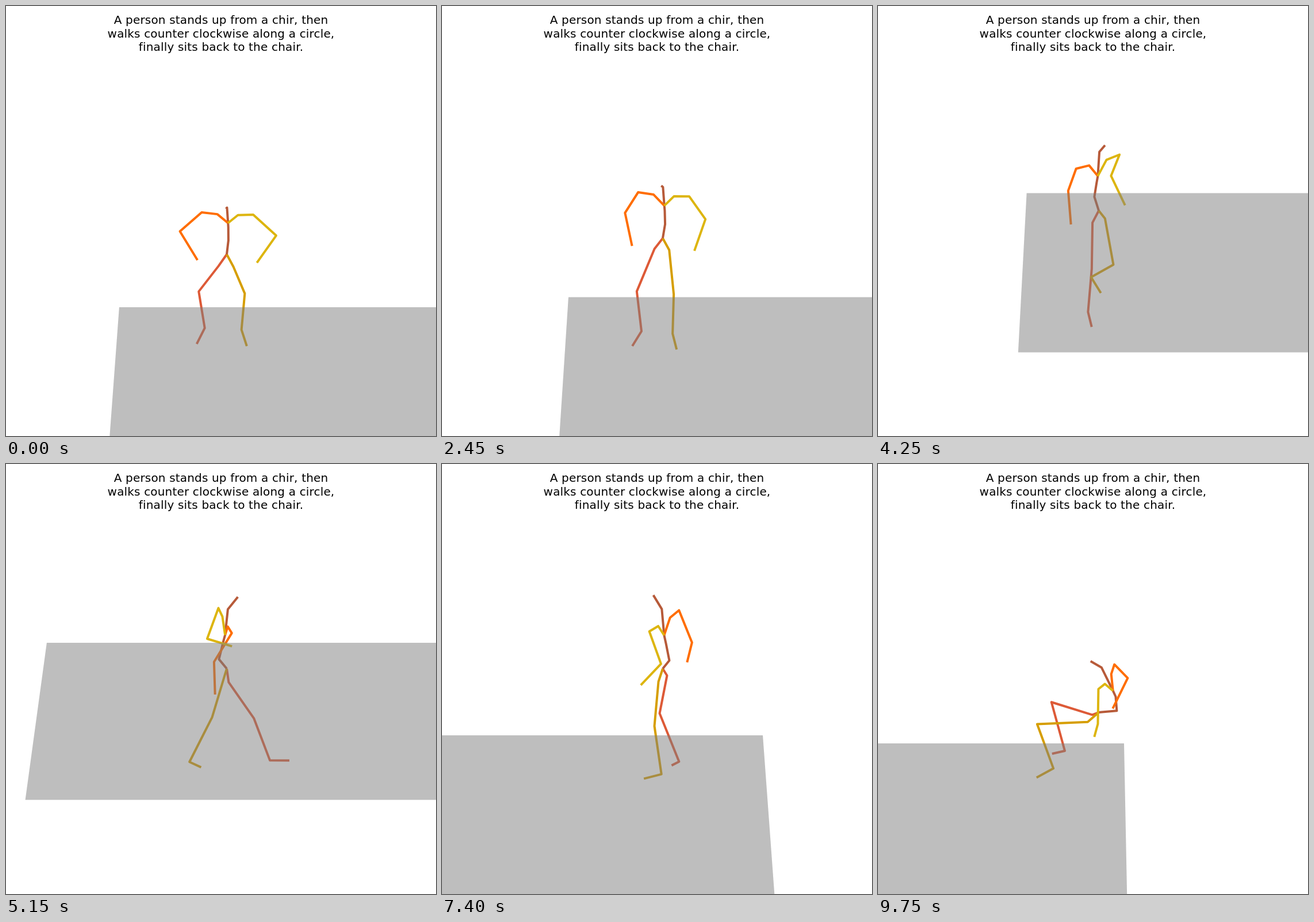
Recreate the animation shown at these times as an HTML page with a canvas. Size 748x748 px, loop 9800 ms.

```html
<!DOCTYPE html>
<html lang="en">
<head>
<meta charset="utf-8">
<title>Walking figure</title>
<style>
  html, body { margin: 0; width: 100%; height: 100%; overflow: hidden; background: #fff; }
  canvas { display: block; }
</style>
</head>
<body>
<canvas id="stage" width="748" height="748"></canvas>
<script>
const ctx = document.getElementById('stage').getContext('2d');
const LOOP = 9800, STEP = 50, RAD = Math.PI / 180;
const CAPTION = [
  'A person stands up from a chir, then',
  'walks counter clockwise along a circle,',
  'finally sits back to the chair.'
];

// Smooth curve through [time, value] points, without overshoot.
function track(...points) {
  const last = points.length - 1;
  const slope = i => (points[i + 1][1] - points[i][1]) / (points[i + 1][0] - points[i][0]);
  const tangent = i => {
    if (i === 0 || i === last) return 0;
    const a = slope(i - 1), b = slope(i);
    return a * b > 0 ? 2 * a * b / (a + b) : 0;
  };
  return t => {
    if (t >= points[last][0]) return points[last][1];
    let i = 0;
    while (t >= points[i + 1][0]) i++;
    const span = points[i + 1][0] - points[i][0], p = (t - points[i][0]) / span, q = 1 - p;
    return q * q * (1 + 2 * p) * points[i][1] + p * p * (3 - 2 * p) * points[i + 1][1]
      + span * p * q * (q * tangent(i) - p * tangent(i + 1));
  };
}

const sitting = track([0, 1], [2100, 1], [2950, 0], [7900, 0], [8900, 1]);
const walking = track([0, 0], [2950, 0], [3300, 1], [6500, 1], [7400, .6], [8000, 0]);
const heading = track([0, -5], [3400, -10], [5150, 105], [6150, 155], [7400, 235], [8900, 252]);
const floorLeft = track([0, -.074], [2050, -.076], [3400, -.0247], [4000, -.0394],
  [5150, -.1367], [6150, -.224], [7400, -.2465], [9050, -.2955], [9750, -.3003]);
const floorFar = track([0, 524], [2050, 526], [3400, 394], [4000, 333],
  [5150, 311], [6150, 367], [7400, 472], [9750, 486]);

const VANISH = { x: 380, y: -1950 }, FLOOR_WIDTH = .32, FLOOR_DEPTH = 4.77e-5;
const STRIDE = 1240, STRIKE = 5150;

// Joints are [side, forward, up] from the hip; angles in degrees from straight down.
const add = (a, b) => a.map((v, i) => v + b[i]);

function bone(from, side, length, pitch, splay) {
  const flat = length * Math.cos(splay * RAD);
  return add(from, [
    side * length * Math.sin(splay * RAD),
    flat * Math.sin(pitch * RAD),
    -flat * Math.cos(pitch * RAD)
  ]);
}

function buildFigure(t) {
  const sit = sitting(t), walk = walking(t);
  const mix = (stand, seat) => stand + (seat - stand) * sit;
  const spine = [
    [0, 0, 0],
    [0, mix(-14, -33), mix(21, 9)],
    [0, mix(-7, -31), mix(52, 37)],
    [0, mix(-3, -26), mix(68, 48)],
    [0, mix(2, -5), mix(119, 91)],
    [0, mix(20, 15), mix(141, 100)]
  ];
  const gait = side => {
    const phase = 2 * Math.PI * (t - STRIKE) / STRIDE + (side > 0 ? 0 : Math.PI);
    return { swing: walk * Math.cos(phase), lift: walk * Math.max(0, -Math.sin(phase)) };
  };

  const leg = side => {
    const { swing, lift } = gait(side);
    const thigh = 8 + 22 * swing, shin = mix(thigh - 12 - 50 * lift, -17);
    const joint = [side * 13, mix(0, 16), mix(-20, -15)];
    const knee = bone(joint, side, 88, mix(thigh, 87), mix(4, 18));
    const ankle = bone(knee, side, 93, shin, mix(0, -5));
    return [spine[0], joint, knee, ankle, bone(ankle, side, 34, shin + 75, 20)];
  };

  const arm = side => {
    const { swing } = gait(side), chest = spine[3];
    const collar = add(chest, [side * 18, mix(0, 9), mix(27, 22)]);
    const shoulder = add(chest, [side * 45, mix(0, 12), mix(29, 26)]);
    const elbow = bone(shoulder, side, 62, mix(-25 - 6 * swing, -14), mix(0, 39));
    return [chest, collar, shoulder, elbow, bone(elbow, side, 59, mix(28 - 30 * swing, 20), mix(14, -33))];
  };

  return [
    ['#dd5a37', leg(1)], ['#d69e00', leg(-1)], ['#b75a39', spine],
    ['#ff6d00', arm(1)], ['#ddb50e', arm(-1)]
  ];
}

function trace(points) {
  ctx.beginPath();
  points.forEach(p => ctx.lineTo(...p));
}

// Camera looks down by 30 degrees and follows the hip.
function drawFigure(t) {
  const yaw = heading(t) * RAD, sin = Math.sin(yaw), cos = Math.cos(yaw);
  const hipY = 356 + 76 * sitting(t);
  const project = ([side, forward, up]) => [
    384 + forward * sin - side * cos,
    hipY - .866 * up + .5 * (forward * cos + side * sin)
  ];
  ctx.lineWidth = 4;
  ctx.lineJoin = 'round';
  for (const [color, joints] of buildFigure(t)) {
    trace(joints.map(project));
    ctx.strokeStyle = color;
    ctx.stroke();
  }
}

function drawFloor(t) {
  const left = floorLeft(t), right = left + FLOOR_WIDTH, far = floorFar(t);
  const near = VANISH.y + 1 / (1 / (far - VANISH.y) - FLOOR_DEPTH);
  const corner = (u, y) => [VANISH.x + u * (y - VANISH.y), y];
  trace([corner(left, far), corner(right, far), corner(right, near), corner(left, near)]);
  ctx.fillStyle = 'rgba(127, 127, 127, .5)';
  ctx.fill();
}

function drawCaption() {
  ctx.font = '20px "DejaVu Sans", sans-serif';
  ctx.letterSpacing = '.17px';
  ctx.textAlign = 'center';
  ctx.fillStyle = '#000';
  CAPTION.forEach((line, i) => ctx.fillText(line, 374, Math.round(31 + 23.6 * i)));
}

const start = performance.now();
function render() {
  const t = Math.floor((performance.now() - start) % LOOP / STEP) * STEP;
  ctx.fillStyle = '#fff';
  ctx.fillRect(0, 0, 748, 748);
  drawFigure(t);
  drawFloor(t);
  drawCaption();
  requestAnimationFrame(render);
}
render();
</script>
</body>
</html>
```
